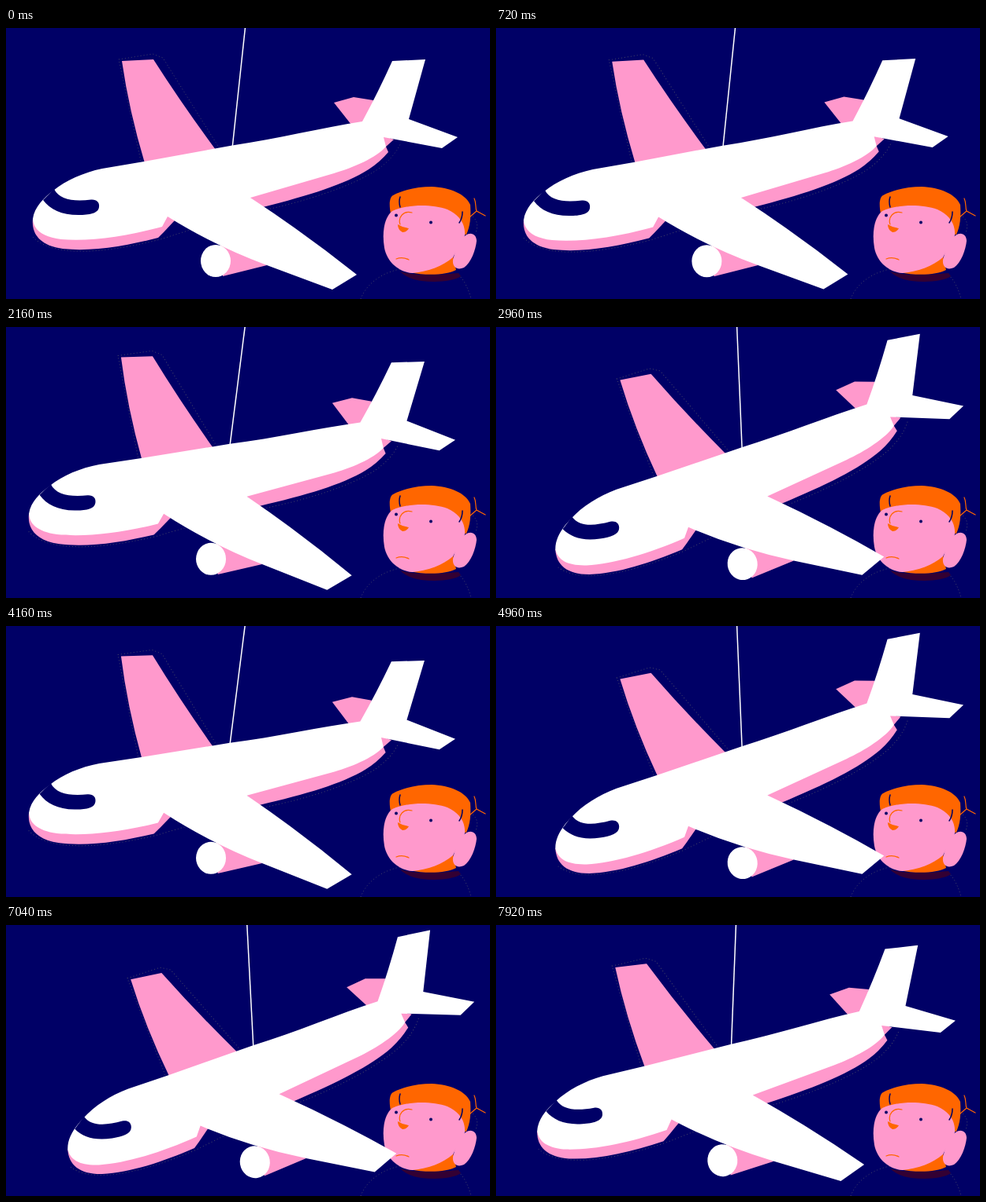
Recreate the animation shown at these times as an HTML page. Size 614 by 345 pixels, loop 8 s.

```html
<!DOCTYPE html>
<html lang="en">
<head>
<meta charset="utf-8">
<title>Hanging plane</title>
<style>
  html, body { margin: 0; width: 100%; height: 100%; overflow: hidden; background: #006; }
  svg { display: block; width: 614px; height: 345px; }
  .white { fill: #fff; }
  .pink { fill: #f9c; }
  .orange { fill: #f60; }
  .navy { fill: #006; }
  .line { fill: none; stroke: #f60; stroke-width: 1.2; stroke-linecap: round; }
  .faint { fill: none; stroke: #446; stroke-width: 1; stroke-dasharray: 1 3; }
  .tuft { fill: none; stroke: #006; stroke-width: 1.5; stroke-linecap: round; }
</style>
</head>
<body>
<svg viewBox="0 0 614 345">
  <rect class="navy" width="614" height="345"/>

  <g id="boy">
    <path class="faint" d="M450 345C456 328 474 312 500 307M574 314C582 322 587 333 590 345M592 240C599 246 599 254 595 262"/>
    <path fill="#303" d="M500 310C518 316 552 314 574 312L577 316C567 323 545 324 527 322C515 320 506 316 500 310Z"/>
    <path class="orange" d="M512 311L567 290L571 308C560 314 535 316 512 311Z"/>
    <path class="orange" d="M488 236C486 226 486 216 491 213C504 206 522 202 540 202C563 203 583 211 589 225C590 240 589 252 584 263L570 262L520 240Z"/>
    <path class="pink" d="M490 233C479 242 477 262 480 280C484 300 500 311 516 312C536 310 554 303 567 292L582 264C583 249 575 238 560 231C540 224 510 224 490 233Z"/>
    <path class="pink" d="M583 264C590 259 597 263 597 271C596 282 590 299 581 305C572 309 566 304 567 295L574 270Z"/>
    <path class="orange" d="M497 250Q503 254 511 255Q508 260 503 260Q497 257 497 250Z"/>
    <path class="line" d="M500 250C497 241 504 232 515 235M495 294Q503 291 511 295M594 217C597 223 595 229 597 233L608 239M597 233L589 240"/>
    <path class="tuft" d="M500 215Q498 221 500 228M579 234Q579 242 575 248"/>
    <circle class="navy" cx="495" cy="238.500" r="2"/>
    <circle class="navy" cx="539" cy="247.500" r="2"/>
  </g>

  <line id="string" x1="305" y1="-15" x2="286.500" y2="158" stroke="#fff" stroke-width="1.500"/>

  <g id="plane">
    <path class="faint" d="M171 169L143 40L186 33L199 38L270 152M34 266C55 288 110 291 196 269L240 255M327 232C390 218 440 200 470 181Q492 166 501 146"/>
    <path class="pink" d="M147 42L187 40Q224 98 266 155L176 172Q156 105 147 42Z"/>
    <path class="pink" d="M416 95L441 88L466 92L458 122L438 123Z"/>
    <path class="pink" d="M34 243C32 263 44 277 72 281C108 285 150 278 193 267L200 260L214 245L205 238Z"/>
    <path class="pink" d="M305 213L326 228C385 213 430 199 460 180Q474 171 485 158L482 151L492 142L479 137Z"/>
    <path class="pink" d="M272 276L290 277L331 302L275 316Z"/>
    <path class="white" d="M34 243C36 228 48 216 60 207C76 194 98 184 122 179L175 170L287 149.500C345 141 400 127 452 119Q472 82 490 42L532 40L511 116L573 139L553 153L479 139L482 151C470 165 440 178 416 185L310 216Q380 262 445 314L414 333L331 302Q262 276 205 240L198 253C150 266 105 272 70 269C46 266 35 257 34 243Z"/>
    <ellipse class="white" cx="266" cy="296.500" rx="19" ry="20.500"/>
    <path class="navy" d="M61 205C68 219 86 221 108 218.500C115 218 119 222 118 228C117 236 106 238 92 238C70 238 56 231 47 219Z"/>
  </g>
</svg>
<script>
  const STEP = 80, PERIOD = 2000;

  // One swing: [ms, degrees from the starting pose]
  const swing = [
    [0, 0], [160, 1.1], [400, 1.4], [640, 0.3], [800, -0.8], [880, -3],
    [960, -8.5], [1060, -9.2], [1200, -9.8], [1440, -9.8], [1640, -9.1],
    [1840, -7.2], [1920, -3.9], [2000, 0]
  ];

  function angleAt(ms) {
    const i = swing.findIndex(key => key[0] > ms);
    const [t0, a0] = swing[i - 1], [t1, a1] = swing[i];
    return a0 + (a1 - a0) * (ms - t0) / (t1 - t0);
  }

  const plane = document.getElementById("plane");
  const string = document.getElementById("string");

  function draw(now) {
    const ms = Math.floor(now / STEP) * STEP % PERIOD;
    const angle = angleAt(ms);
    plane.setAttribute("transform", `rotate(${angle} 324 -15)`);
    string.setAttribute("transform", `rotate(${angle} 305 -15)`);
    requestAnimationFrame(draw);
  }
  draw(performance.now());
</script>
</body>
</html>
```
